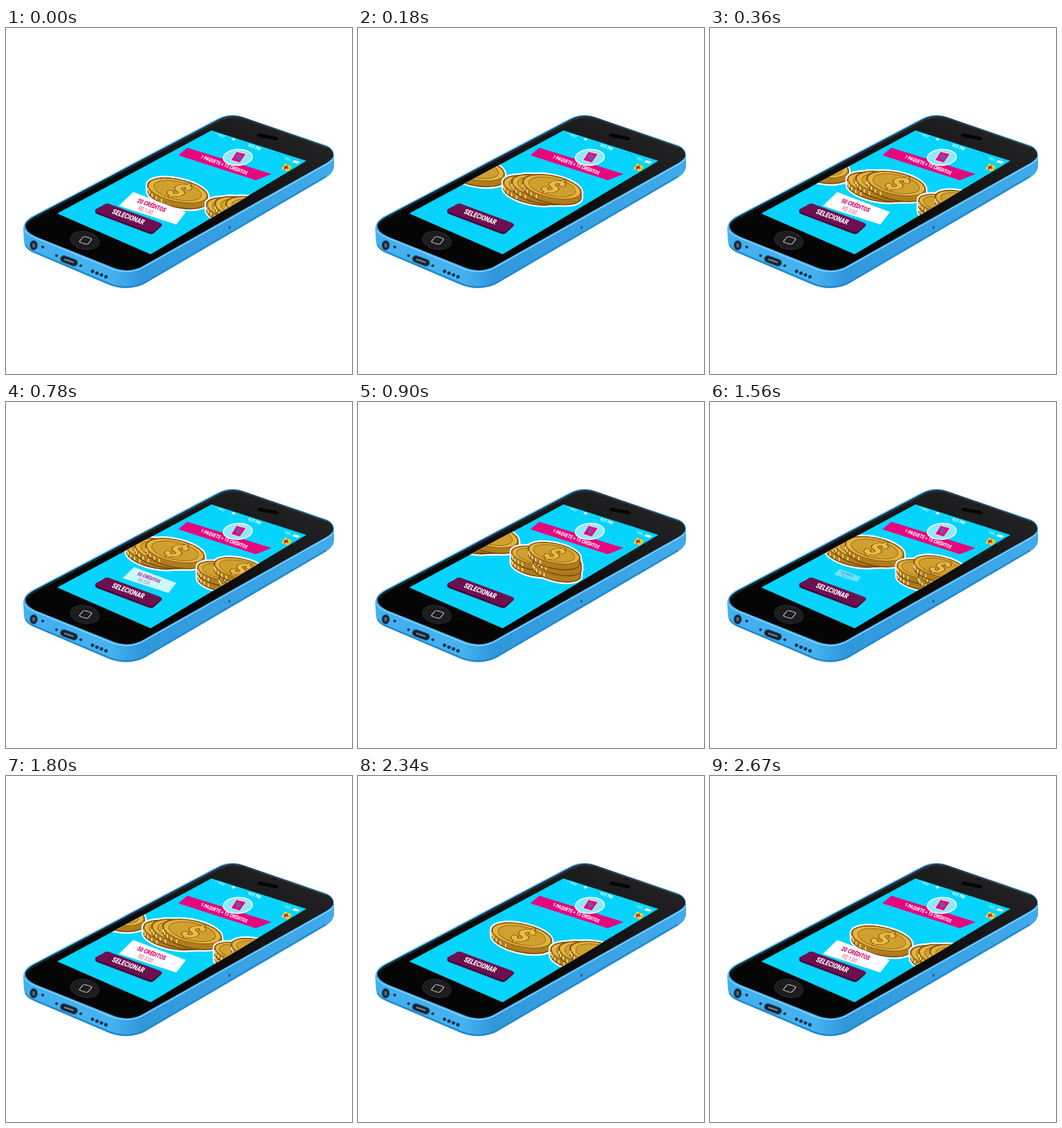
Write an HTML page that moves like this. It is 500x500 px and loops after 2700 ms.

```html
<!DOCTYPE html>
<html lang="pt">
<head>
<meta charset="utf-8">
<style>
html, body { margin: 0; width: 100%; height: 100%; overflow: hidden; background: #fff; }
svg { display: block; width: 100vw; height: 100vh; }
text { font-family: Roboto, "Liberation Sans", sans-serif; font-weight: 900; text-anchor: middle; }
.thin { font-weight: 400; }
</style>
</head>
<body>
<svg viewBox="0 0 500 500">
  <defs>
    <linearGradient id="body" x1="0" y1="0" x2="1" y2="0">
      <stop offset="0" stop-color="#42b0ee"/>
      <stop offset=".28" stop-color="#46b2f0"/>
      <stop offset=".38" stop-color="#2f98dc"/>
      <stop offset="1" stop-color="#40aaea"/>
    </linearGradient>
    <linearGradient id="glass" x1="0" y1="1" x2="1" y2="0">
      <stop offset=".4" stop-color="#050506"/>
      <stop offset="1" stop-color="#29292b"/>
    </linearGradient>
    <clipPath id="screen"><path d="M74 268L297 148L434 192L209 327Z"/></clipPath>
  </defs>

  <path fill="url(#body)" d="M25 290Q25 280 36 273L308 130Q326 122 344 129L464 170Q475 175 474 187V201Q473 209 463 216L198 371Q173 381 148 371L38 324Q27 318 26 309Z"/>
  <path fill="none" stroke="#2484c6" stroke-width="2" d="M28 313Q30 319 39 323L149 369.500Q173 379 197 369.500L462 214.500"/>
  <path fill="none" stroke="#7fd0fb" stroke-width="1.500" d="M27 292Q29 298 42 303L154 348.500Q176 356 196 347L463 197Q472 192 473 187"/>
  <path fill="url(#glass)" d="M28 286Q28 280 40 273L310 131Q326 124 342 129L463 171Q473 175 473 184Q473 189 463 195L194 346Q175 354 157 347L42 301Q28 294 28 286Z"/>
  <path fill="none" stroke="#454549" d="M31 284Q31 280 42 274L311 132.500Q326 126 342 130.500L463 172"/>

  <path stroke="#050506" stroke-width="5" stroke-linecap="round" d="M366 155L391 160"/>
  <ellipse cx="388" cy="149" rx="2" ry="1.500" fill="#111114"/>
  <ellipse cx="114" cy="307" rx="21" ry="13" transform="rotate(10 114 307)" fill="#1d1d20" stroke="#2d2d31"/>
  <rect x="-6.500" y="-6.500" width="13" height="13" rx="3" transform="matrix(.95 .3 -.55 .65 115 307)" fill="none" stroke="#b9b9bd" stroke-width="1.300"/>
  <ellipse cx="40" cy="314" rx="5.500" ry="7" fill="#15212c" stroke="#2374ad"/>
  <ellipse cx="40" cy="314" rx="2.500" ry="3.500" fill="#55606a"/>
  <rect x="-13" y="-5" width="26" height="10" rx="5" transform="translate(91 336.500) rotate(20)" fill="#17212b" stroke="#2374ad"/>
  <path stroke="#6b7782" stroke-width="2.500" stroke-linecap="round" d="M85 334.500L97 338.500"/>
  <path stroke="#12324a" stroke-width="5" stroke-linecap="round" stroke-dasharray="0 7" d="M125 351.500L147 360.500"/>
  <path stroke="#12324a" stroke-width="4" stroke-linecap="round" d="M53 316.500h.1M73 329h.1M108 343.500h.1"/>
  <ellipse cx="323" cy="288" rx="2" ry="2.500" fill="#1c6fae"/>

  <g clip-path="url(#screen)">
    <path fill="#06d4fc" d="M70 140H440V330H70Z"/>
    <g id="coins"></g>
    <g id="fixed"></g>
    <g id="label"></g>
  </g>
</svg>
<script>
const $ = id => document.getElementById(id);
const STEP = { x: 91, y: 36.5 };           // distance between neighbouring packs
const TILT = 12, FLAT = .37;

// Text lying on the tilted screen
const flat = (x, y, size, fill, str, cls = '') =>
  `<text class="${cls}" transform="matrix(.66 .24 -.5 .8 ${x} ${y})" font-size="${size}" fill="${fill}">${str}</text>`;

function coinSide(rx, h) {
  const a = TILT * Math.PI / 180, c = Math.cos(a), s = Math.sin(a), ry = rx * FLAT;
  const X = Math.hypot(rx * c, ry * s), Y = (rx * rx - ry * ry) * s * c / X;
  const arc = `A${rx} ${ry} ${TILT} 0 1 `;
  return `M${-X} ${-Y}${arc}${X} ${Y}v${h}${arc}${-X} ${h - Y}Z`;
}

function coin([x, y, rx, h, sign]) {
  const ry = rx * FLAT;
  const oval = (k, fill, stroke) =>
    `<ellipse rx="${rx * k}" ry="${ry * k}" transform="rotate(${TILT})" fill="${fill}" stroke="${stroke}"/>`;
  let marks = '';
  for (let i = 0; i < 5; i++) {
    const a = (118 + i * 13) * Math.PI / 180, t = TILT * Math.PI / 180;
    const u = rx * Math.cos(a), v = ry * Math.sin(a);
    marks += `M${u * Math.cos(t) - v * Math.sin(t)} ${u * Math.sin(t) + v * Math.cos(t) + 2}v${h - 3}`;
  }
  const mark = sign ? `<text transform="matrix(1.1 .3 -.85 .55 -9 7)" font-size="${rx * .86}" fill="#e9bd45" stroke="#805313" stroke-width="2" paint-order="stroke">$</text>` : '';
  return `<g transform="translate(${x} ${y})">
    <path d="${coinSide(rx, h)}" fill="#b07c1c" stroke="#76490d" stroke-width="1.500"/>
    <path d="${marks}" stroke="#f5dc94" stroke-width="1.800"/>
    ${oval(.98, '#e5b43d', '#8a5b15')}${oval(.8, '#d0a02f', '#9b6b1b')}${mark}</g>`;
}

function pile(list) {
  const rim = list.map(([x, y, rx, h]) =>
    `<path transform="translate(${x} ${y})" d="${coinSide(rx, h)}"/>`).join('');
  return `<g fill="#fff" stroke="#fff" stroke-width="6" stroke-linejoin="round">${rim}</g>` + list.map(coin).join('');
}

// Coins: x, y, radius, thickness, shows sign
const packs = [
  { name: '20 CRÉDITOS', price: 'R$ 1,00', coins: [[248, 235, 44, 8, 1]] },
  { name: '50 CRÉDITOS', price: 'R$ 3,00', coins: [[240, 226, 42, 8], [253, 225, 43, 8], [269, 225, 43, 8, 1]] },
  { name: '150 CRÉDITOS', price: 'R$ 5,00', coins: [[244, 226, 34, 8], [244, 218, 34, 8], [276, 233, 35, 8], [278, 224, 34, 8], [272, 214, 38, 8, 1]] }
];

$('coins').innerHTML = packs.map(p => `<g>${pile(p.coins)}</g>`).join('');

$('fixed').innerHTML = `
  <path d="M262 173L384 211L361 220L249 184Z" fill="#e5077e"/>
  <ellipse cx="335" cy="187" rx="21" ry="11.500" transform="rotate(-4 335 187)" fill="#8ce9fb" stroke="#fff" stroke-width="1.500"/>
  <path d="M333 178.500L347 182L338 195L325 191Z" fill="#e5077e" stroke="#fff" stroke-width=".8"/>
  <circle cx="336" cy="186.500" r="4" fill="#7652a2"/>
  ${flat(314, 200, 8.2, '#fff', '1 PAQUETE = 15 CRÉDITOS')}
  ${flat(308, 156, 5.5, '#fff', '•••• REDE', 'thin')}
  <path d="M326 160q3-2 6 1l-4 2Z" fill="#fff"/>
  ${flat(358, 174, 7, '#fff', '4:21 PM')}
  ${flat(406, 191, 6, '#fff', '100%', 'thin')}
  <path d="M417 191L425 194L421 196L413 193.500Z" fill="#fff"/>
  <path d="M403 196L413 200L408 207L398 204Z" fill="#ffd51c"/>
  <path d="M402 200L408 203M407 199L402 204" stroke="#c3164d" stroke-width="2"/>
  <path d="M148 254L221 281Q228 284 224 287L214 296Q211 299 206 297L132 269Q126 266 131 263L141 256Q144 253 148 254Z" fill="#480a36"/>
  <path d="M148 254L221 281Q228 284 224 286L214 293Q211 296 206 294L132 266Q126 264 131 261L141 256Q144 253 148 254Z" fill="#6c1050"/>
  ${flat(175, 276, 11.5, '#fff', 'SELECIONAR')}`;

const labels = packs.map(p => `
  <path d="M184 237L260 266L246 284L163 257Z" fill="#fff"/>
  ${flat(209, 259, 10, '#d5096b', p.name)}
  ${flat(200, 266, 9.5, '#e0488f', p.price, 'thin')}`);

// Slides: start time, from pack, to pack
const slides = [[60, 0, 1], [780, 1, 2], [1500, 2, 1], [2220, 1, 0]];
let shown = -1;

function draw(now) {
  const time = now % 2700;
  const [start, from, to] = slides.filter(s => s[0] <= time).pop() || [-300, 0, 0];
  const k = Math.min(1, (Math.floor((time - start) / 30) + 1) / 10);
  const pos = from + (to - from) * (1 - (1 - k) ** 3);
  [...$('coins').children].forEach((pack, i) => {
    // Packs beyond the direct neighbours wait farther out
    const gap = i - pos, off = gap + 1.7 * Math.sign(gap) * Math.max(0, Math.abs(gap) - 1);
    pack.setAttribute('transform', `translate(${off * STEP.x} ${off * STEP.y})`);
  });

  const pack = k < .5 ? from : to, size = Math.abs(1 - 2 * k);
  if (pack !== shown) $('label').innerHTML = labels[shown = pack];
  $('label').setAttribute('transform', `translate(190 244) scale(${size}) translate(-190 -244)`);
  $('label').setAttribute('opacity', size);
}

const begin = performance.now();
function tick() {
  draw(performance.now() - begin);
  requestAnimationFrame(tick);
}
tick();
</script>
</body>
</html>
```
